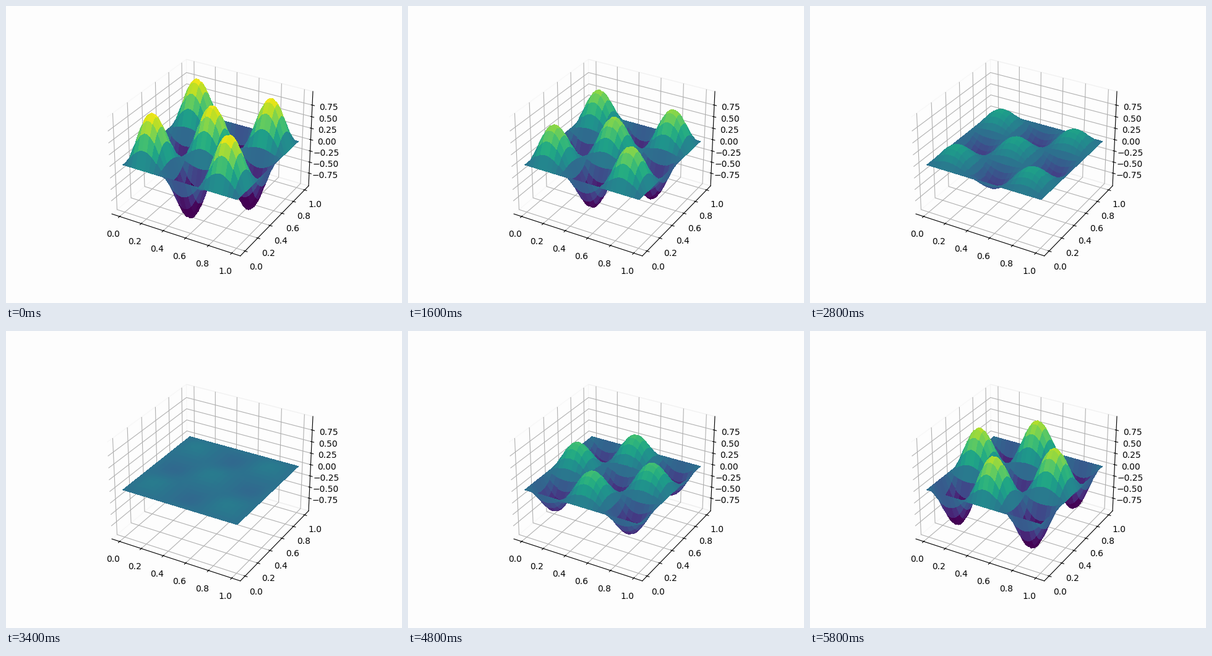
Write a matplotlib script that moves like this. It is 640 by 480 pixels and loops after 6000 ms.

```python
import numpy as np
import matplotlib.pyplot as plt
from matplotlib.animation import FuncAnimation

FRAMES = 30
DURATION = 0.2                        # simulated time of one loop
OMEGA = 3 * np.pi * np.sqrt(2)        # frequency of the (3, 3) membrane mode
PAPER = "#fdfdfd"

fig = plt.figure(figsize=(6.4, 4.8), dpi=100, facecolor=PAPER)
ax = fig.add_subplot(projection="3d", facecolor=PAPER)

grid = np.linspace(0, 1, 51)
X, Y = np.meshgrid(grid, grid)
MODE = np.sin(3 * np.pi * X) * np.sin(3 * np.pi * Y)


def padded(lo, hi, part):
    pad = (hi - lo) * part
    return lo - pad, hi + pad


side = padded(*padded(0, 1, 0.05), 1 / 48)
ax.set(xlim=side, ylim=side, zlim=padded(-0.998, 0.998, 1 / 48))
ax.set_xticks(np.linspace(0, 1, 6))
ax.set_yticks(np.linspace(0, 1, 6))
ax.set_zticks(np.linspace(-0.75, 0.75, 7))
for axis in (ax.xaxis, ax.yaxis, ax.zaxis):
    axis.pane.fill = False

surface = None


def draw(i):
    global surface
    if surface is not None:
        surface.remove()
    height = MODE * np.cos(OMEGA * DURATION * i / FRAMES)
    surface = ax.plot_surface(X, Y, height, cmap="viridis", vmin=-0.6, vmax=1,
                              rstride=2, cstride=2, linewidth=0,
                              antialiased=False)
    return (surface,)


anim = FuncAnimation(fig, draw, frames=FRAMES, interval=200,
                     init_func=lambda: (), repeat=True, repeat_delay=0)
plt.show()
```
